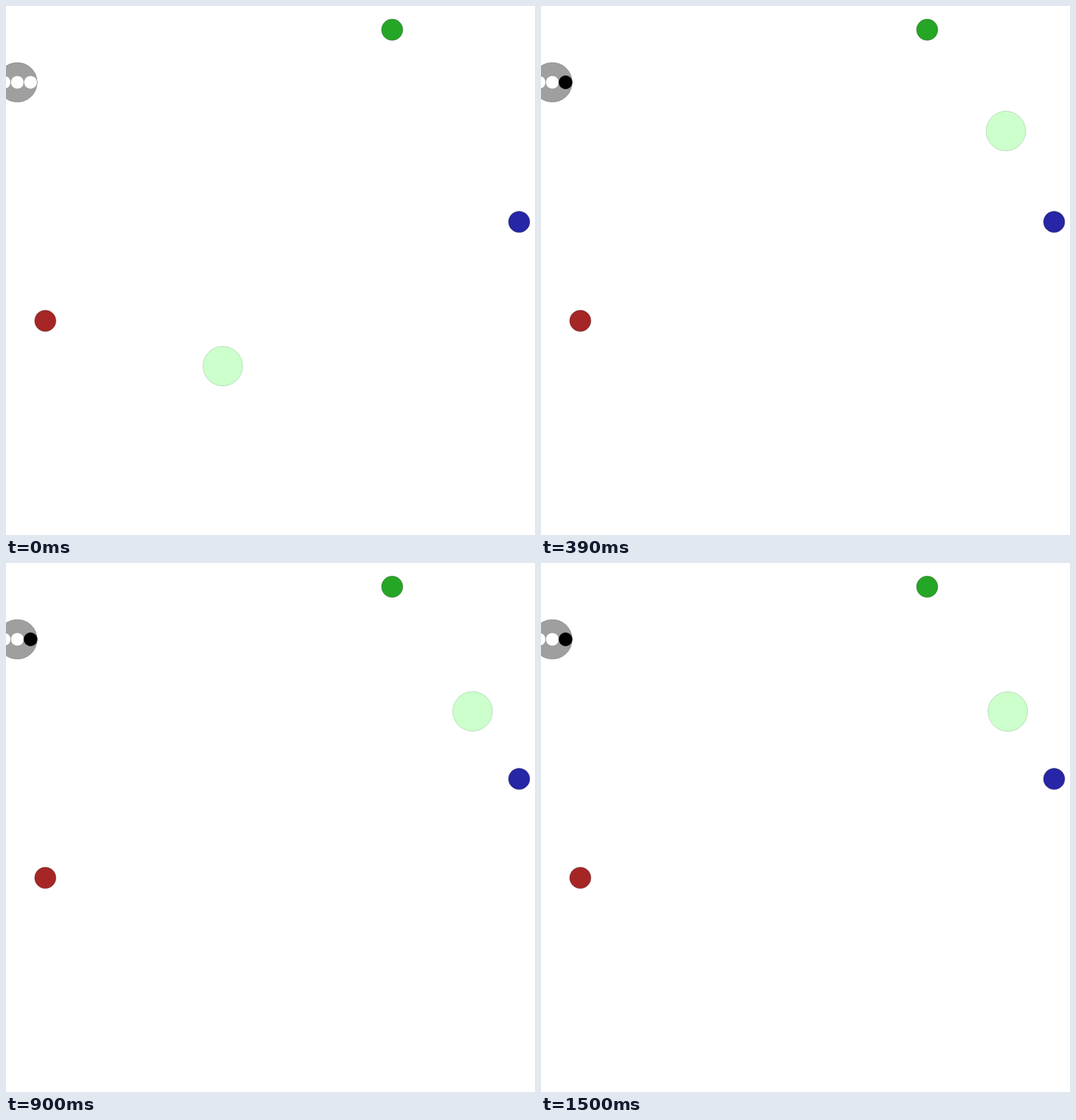
Animation, 700 px wide and 700 px high, one loop 1530 ms. Source, as an HTML page with a canvas:

```html
<!DOCTYPE html>
<html lang="en">
<head>
<meta charset="utf-8">
<title>Listener and landmarks</title>
<style>
  html, body { margin: 0; width: 100%; height: 100%; overflow: hidden; background: #fff; }
  canvas { display: block; }
</style>
</head>
<body>
<canvas id="stage" width="700" height="700"></canvas>
<script>
const ctx = document.getElementById('stage').getContext('2d');
const STEP = 30, STEPS = 51;
const PUSH = 17.5, KEEP = 0.75; // pixels per step gained by a push, speed kept per step

// One letter per step: Left, Right, Up, Down or coast
const plan = 'RUUUUURRRRR.DL.L.R....L.R...' + 'LR..'.repeat(6);
const pushes = { L: [-1, 0], R: [1, 0], U: [0, -1], D: [0, 1], '.': [0, 0] };

const path = [[286.9, 476.55]];
let vx = 0, vy = 0;
for (let i = 0; i < STEPS - 1; i++) {
  const [ux, uy] = pushes[plan[i]];
  const [x, y] = path[i];
  vx = vx * KEEP + ux * PUSH;
  vy = vy * KEEP + uy * PUSH;
  path.push([x + vx, y + vy]);
}

function disc(x, y, r, rgb, alpha = 1) {
  const paint = (k) => `rgba(${rgb.map(c => Math.round(c * k * 255))},${alpha * k})`;
  ctx.beginPath();
  for (let i = 0; i < 30; i++) {
    const a = i * Math.PI / 15;
    ctx.lineTo(x + r * Math.cos(a), y + r * Math.sin(a));
  }
  ctx.closePath();
  ctx.fillStyle = paint(1);
  ctx.fill();
  ctx.strokeStyle = paint(0.5);
  ctx.lineWidth = 1;
  ctx.stroke();
}

function draw(step) {
  ctx.fillStyle = '#fff';
  ctx.fillRect(0, 0, 700, 700);
  disc(15, 101, 26.25, [0.25, 0.25, 0.25], 0.5);
  const lit = step === 0 ? -1 : step === 1 ? 1 : 2;
  for (let i = 0; i < 3; i++) {
    const c = i === lit ? 0 : 1;
    disc(15 + (i - 1) * 17.5, 101, 8.75, [c, c, c]);
  }
  const [x, y] = path[step];
  disc(x, y, 26.25, [0.6, 1, 0.6], 0.5);
  disc(52, 416.6, 14, [0.65, 0.15, 0.15]);
  disc(511, 31.4, 14, [0.15, 0.65, 0.15]);
  disc(679, 285.7, 14, [0.15, 0.15, 0.65]);
}

const start = performance.now();
function tick() {
  const t = Math.max(0, performance.now() - start);
  draw(Math.floor(t / STEP) % STEPS);
  requestAnimationFrame(tick);
}
tick();
</script>
</body>
</html>
```
